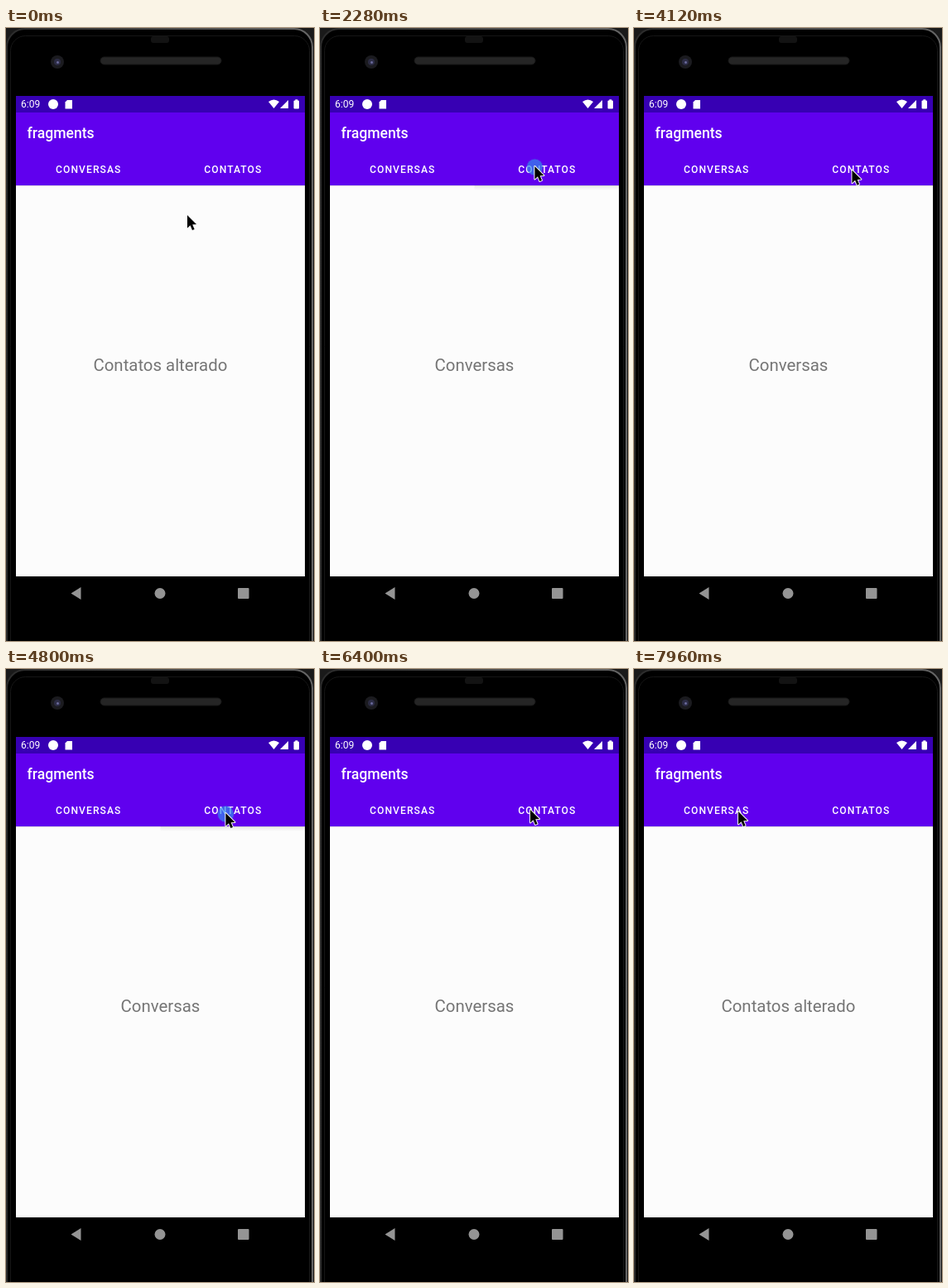
These frames come from a looping animation (372x740 px, 8 s). An HTML page with a canvas:

```html
<!DOCTYPE html>
<html lang="pt">
<head>
<meta charset="utf-8">
<title>Tabs</title>
<style>
html, body { margin: 0; width: 100%; height: 100%; overflow: hidden; background: #000; }
canvas { display: block; width: 372px; height: 740px; }
</style>
</head>
<body>
<canvas id="stage" width="372" height="740"></canvas>
<script>
const ctx = document.getElementById('stage').getContext('2d');
const LOOP = 8000, STEP = 40;
const FONT = 'Roboto, sans-serif';
const WHITE = '#fff', GREY = '#949494', PURPLE = '#6000ee';
const LEFT = 12, MIDDLE = 186.5, RIGHT = 361;

// Pointer stops: it arrives, taps, drifts a little, then swings to the next
const start = { x: 219, y: 226 };
const stops = [
  { arrive: 640, press: 760, x: 100, y: 171 },
  { arrive: 2120, press: 2200, x: 259, y: 167 },
  { arrive: 3360, press: 3440, x: 134, y: 166 },
  { arrive: 4320, press: 4720, x: 265, y: 174 },
  { arrive: 5440, press: 5560, x: 118, y: 172 },
  { arrive: 6400, press: 6740, x: 254, y: 170 },
  { arrive: 7960, press: 8100, x: 126, y: 172 }
];
const TRAVEL = 560, DRIFT = 14, SWITCH_DELAY = 150, HALO_TIME = 440, LIFT_TIME = 500;
const labels = ['Conversas', 'Contatos alterado'];

const clamp = v => Math.max(0, Math.min(1, v));
const ease = u => u * u * (3 - 2 * u);
const mix = (a, b, u) => a + (b - a) * u;
const tabOf = stop => stop.x > MIDDLE ? 1 : 0;

// Swing that runs a little too far and settles back
const swing = u => ease(clamp(u / 0.75)) + 0.07 * Math.sin(Math.PI * clamp((u - 0.55) / 0.45));

function pointer(t) {
  let { x, y } = start;
  for (const stop of stops) {
    const u = clamp((t - stop.arrive + TRAVEL) / TRAVEL);
    if (u === 0) break;
    x = mix(x, stop.x, swing(u)) + DRIFT * ease(clamp((t - stop.press) / 800));
    y = mix(y, stop.y, ease(u));
  }
  return [x, y];
}

function rect(x, y, w, h, color) {
  ctx.fillStyle = color;
  ctx.fillRect(x, y, w, h);
}

function disc(x, y, r, color) {
  ctx.fillStyle = color;
  ctx.beginPath();
  ctx.arc(x, y, r, 0, 7);
  ctx.fill();
}

function poly(points, color) {
  ctx.fillStyle = color;
  ctx.beginPath();
  points.forEach(([x, y]) => ctx.lineTo(x, y));
  ctx.closePath();
  ctx.fill();
}

function round(x, y, w, h, r, fill, stroke, line = 1) {
  ctx.beginPath();
  ctx.roundRect(x, y, w, h, r);
  if (fill) { ctx.fillStyle = fill; ctx.fill(); }
  if (stroke) { ctx.strokeStyle = stroke; ctx.lineWidth = line; ctx.stroke(); }
}

function text(str, x, y, size, weight, color, align = 'left', spacing = 0) {
  ctx.font = `${weight} ${size}px ${FONT}`;
  ctx.letterSpacing = spacing + 'px';
  ctx.textAlign = align;
  ctx.fillStyle = color;
  ctx.fillText(str, x, y);
}

function phone() {
  const rim = ctx.createLinearGradient(0, 0, 372, 0);
  rim.addColorStop(0, '#2b2b2b');
  rim.addColorStop(1, '#666');
  rect(0, 0, 372, 740, '#1a1a1a');
  round(1, 1, 369, 800, 22, '#000', rim, 2);
  round(5.5, 9.5, 361, 800, 18, '#000', '#161616');
  round(175, 10, 22, 8, 3, '#131313');
  round(114, 35, 146, 9, 4.5, '#252525', '#181818');
  disc(62, 41, 8, '#1b1b1f');
  disc(62, 41, 4, '#2c2c44');
  disc(62.5, 41.5, 1.5, '#6a6a9c');
}

function statusBar() {
  rect(LEFT, 82, RIGHT - LEFT, 20, '#3700b3');
  text('6:09', 18, 96.3, 12, 400, WHITE);
  disc(57, 92, 6, WHITE);
  poly([[71.5, 89.5], [74, 87], [80, 87], [80, 97.5], [71.5, 97.5]], WHITE);
  ctx.beginPath();
  ctx.moveTo(323.5, 97);
  ctx.lineTo(317, 89);
  ctx.quadraticCurveTo(323.5, 84, 330, 89);
  ctx.fill();
  poly([[331, 97], [341, 87], [341, 97]], WHITE);
  round(347.5, 87.5, 6.5, 10, 1, WHITE);
  rect(349.3, 86.3, 3, 2, WHITE);
}

// A pressed tab rises and casts a soft shadow below itself
function lift(t) {
  for (const stop of stops) {
    const u = clamp((t - stop.press) / LIFT_TIME);
    const alpha = 0.16 * Math.sin(Math.PI * u);
    const shade = ctx.createLinearGradient(0, 190, 0, 196);
    shade.addColorStop(0, `rgba(0,0,0,${alpha})`);
    shade.addColorStop(1, 'rgba(0,0,0,0)');
    rect(tabOf(stop) ? MIDDLE : LEFT, 190, MIDDLE - LEFT, 6, shade);
  }
}

function screen(t) {
  rect(LEFT, 102, RIGHT - LEFT, 560, '#fcfcfc');
  rect(LEFT, 102, RIGHT - LEFT, 88, PURPLE);
  rect(LEFT, 190, RIGHT - LEFT, 1, '#e2e2e2');
  lift(t);
  statusBar();
  text('fragments', 25.5, 132.5, 17.6, 500, WHITE);
  text('CONVERSAS', 60, 174.5, 12.1, 500, WHITE, 'left', 1.08);
  text('CONTATOS', 239.3, 174.5, 12.1, 500, WHITE, 'left', 1.08);

  let shown = 1;
  for (const stop of stops) if (t >= stop.press + SWITCH_DELAY) shown = tabOf(stop);
  text(labels[shown], 186.4, 414.3, 20.4, 400, '#757575', 'center');
}

function navBar() {
  poly([[78.5, 682.5], [90.5, 675], [90.5, 690]], GREY);
  disc(186, 682.5, 6.5, GREY);
  round(280, 676, 13.5, 13, 1, GREY);
}

function halo(t, x, y) {
  for (const { press } of stops) {
    const u = (t - press) / HALO_TIME;
    if (u < 0 || u >= 1) continue;
    const r = 9 + 2 * clamp(u * 1.5);
    disc(x, y + 1, r, `rgba(50,140,235,${0.75 - 0.35 * u})`);
    ctx.strokeStyle = `rgba(60,135,235,${0.8 * u})`;
    ctx.lineWidth = 2;
    ctx.stroke();
  }
}

function arrow(x, y) {
  ctx.save();
  ctx.translate(x, y);
  ctx.beginPath();
  [[0, 0], [0, 15.5], [3.6, 12.2], [6, 18], [8.6, 16.9], [6.2, 11.3], [11, 11]]
    .forEach(p => ctx.lineTo(...p));
  ctx.closePath();
  ctx.lineJoin = 'round';
  ctx.lineWidth = 2;
  ctx.strokeStyle = '#f4f4f4';
  ctx.stroke();
  ctx.fillStyle = '#000';
  ctx.fill();
  ctx.restore();
}

function draw(t) {
  phone();
  screen(t);
  navBar();
  const [x, y] = pointer(t);
  halo(t, x, y);
  arrow(x, y);
}

const begin = performance.now();
function tick() {
  const t = (performance.now() - begin) % LOOP;
  draw(Math.floor(t / STEP) * STEP);
  requestAnimationFrame(tick);
}
tick();
</script>
</body>
</html>
```
